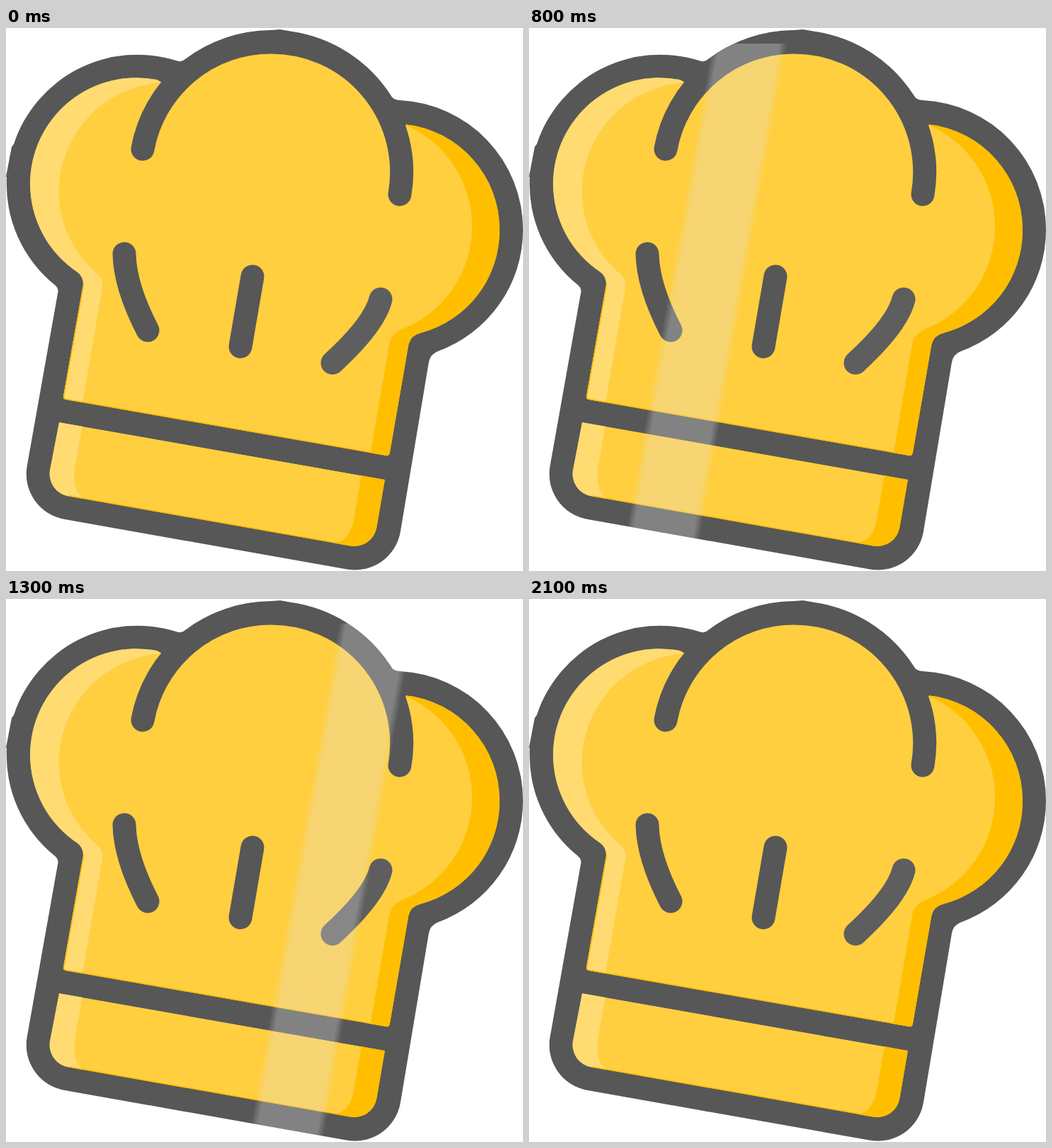
An HTML page that plays this animation: 730 px wide and 767 px high, repeating every 7100 ms.

```html
<!DOCTYPE html>
<html>
<head>
<meta charset="utf-8">
<title>Chef hat</title>
<style>
  html, body { margin: 0; width: 100%; height: 100%; overflow: hidden; background: #fff; }
  svg { display: block; width: 100vw; height: 100vh; }
  .line { fill: none; stroke: #575757; stroke-width: 33; stroke-linecap: round; }
  .rim { fill: none; stroke: #ffbf00; stroke-width: 3; }
  .base { fill: #ffcf40; }
  .light { fill: #ffdb72; }
  .shade { fill: #ffbf00; }
</style>
</head>
<body>
<svg viewBox="0 0 730 767">
  <defs>
    <path id="hat" d="M240 46Q247 49 254 44A200 200 0 0 1 374 3L387 2L404 5A200 200 0 0 1 543 95Q547 102 556 102A183 183 0 0 1 730 285A183 183 0 0 1 609 457Q599 461 597 472L557 711A65 65 0 0 1 481 764.5L83 694A65 65 0 0 1 30 617L73 375Q75 368 69 363A183.5 183.5 0 0 1 1 211L0 210L8 168L11 164A183.5 183.5 0 0 1 240 46Z"/>
    <path id="crown" d="M109 362L81 520Q80 524 85 525L537 604Q541 605 542 600L568.5 447Q572 434 585 431A150 150 0 0 0 697 285A150 150 0 0 0 565 136L552 160A183 183 0 0 0 233 86L219 76L213 73A150 150 0 0 0 34 220A150 150 0 0 0 101 345Q109 351 109 362Z"/>
    <path id="band" d="M75 557L535 638L523.5 705A32 32 0 0 1 486 731.5L89 661.5A32 32 0 0 1 62.5 622Z"/>
    <clipPath id="inHat"><use href="#hat"/></clipPath>
    <clipPath id="inCrown"><use href="#crown"/></clipPath>
    <clipPath id="inBand"><use href="#band"/></clipPath>
    <linearGradient id="glow">
      <stop offset="0" stop-color="#e2e2e2" stop-opacity="0"/>
      <stop offset=".1" stop-color="#e2e2e2"/>
      <stop offset=".9" stop-color="#e2e2e2"/>
      <stop offset="1" stop-color="#e2e2e2" stop-opacity="0"/>
    </linearGradient>
  </defs>

  <use href="#hat" fill="#575757"/>

  <g clip-path="url(#inCrown)">
    <use href="#crown" class="base"/>
    <path class="light" d="M219 77A155 155 0 0 0 74.5 232A154 154 0 0 0 127 346Q138 354 136 367L106 540H0V60H200Z"/>
    <path class="shade" d="M564 137A156 156 0 0 1 560 425Q543 432 541 447L513 610H730V130Z"/>
    <path class="rim" d="M109 362L81 520Q80 524 85 525L537 604"/>
  </g>

  <g clip-path="url(#inBand)">
    <use href="#band" class="base"/>
    <path class="light" d="M109 555L97 622Q93 652 109 665L50 690V540Z"/>
    <path class="shade" d="M503 625L491 694Q485 726 462 728V760H560V625Z"/>
    <path class="rim" d="M89 661.5L486 731.5"/>
  </g>

  <path class="line" d="M193 171A183.5 183.5 0 0 1 375 20A183.5 183.5 0 0 1 556 235"/>
  <path class="line" d="M167 319Q168 365 200 427"/>
  <path class="line" d="M348 351L331 450"/>
  <path class="line" d="M529 383Q520 419 461 473" style="stroke:#5e5e5e"/>

  <g clip-path="url(#inHat)">
    <g id="shine">
      <rect width="106" height="800" fill="url(#glow)" opacity=".31" transform="skewX(-10)"/>
    </g>
  </g>
</svg>
<script>
  const LOOP = 7100, STEP = 100, SWEEP_STEPS = 20;
  const shine = document.getElementById("shine");
  const start = performance.now();

  function draw(now) {
    const step = Math.floor(Math.max(0, now - start) % LOOP / STEP);
    const x = 258.5 + 42.4 * (step - 8);
    const y = 22 + 2.5 * (step - 8);
    shine.setAttribute("transform", `translate(${x} ${y})`);
    shine.style.display = step > 0 && step <= SWEEP_STEPS ? "" : "none";
    requestAnimationFrame(draw);
  }
  draw(start);
</script>
</body>
</html>
```
